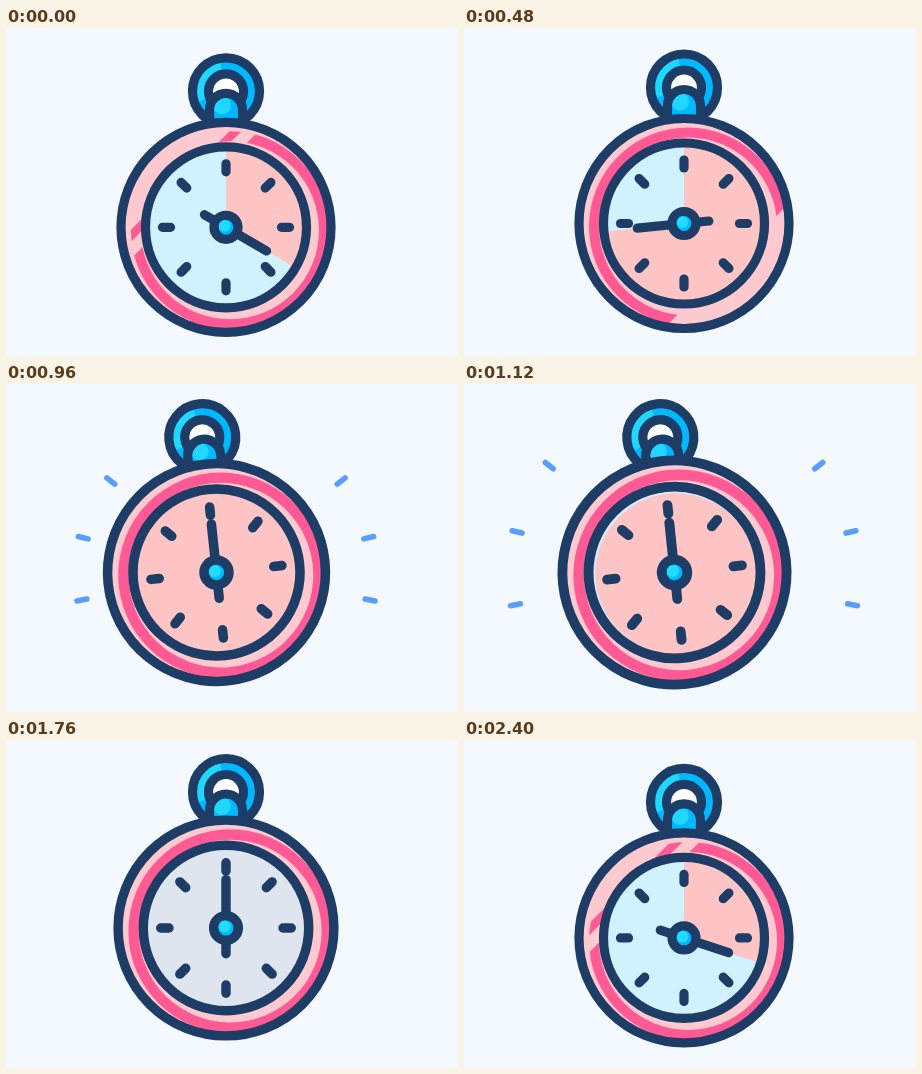
These frames come from a looping animation (452x328 px, 2.44 s). An HTML page:

```html
<!DOCTYPE html>
<html lang="en">
<head>
<meta charset="utf-8">
<title>Stopwatch</title>
<style>
  html, body { margin: 0; width: 100%; height: 100%; overflow: hidden; background: #f4f9ff; }
  svg { display: block; width: 100vw; height: 100vh; }
  .ink { stroke: #1d3c66; stroke-width: 9.2; stroke-linecap: round; stroke-linejoin: round; }
</style>
</head>
<body>
<svg viewBox="0 0 452 328">
  <defs>
    <clipPath id="rim"><circle r="105"/></clipPath>
    <clipPath id="dial"><circle r="80.5"/></clipPath>
    <clipPath id="dome"><path d="M-16.5 -98V-117.5a16.5 16.5 0 0 1 33 0V-98z"/></clipPath>
  </defs>
  <g id="rays" stroke="#5a9dff" stroke-linecap="round"></g>
  <g id="watch">
    <g transform="translate(0 -136)">
      <circle r="33.5" fill="#00b8ff"/>
      <path d="M-24 9A25.6 25.6 0 0 1 -5 -25.1" fill="none" stroke="#20d8ff" stroke-width="8"/>
      <circle class="ink" r="33.5" fill="none"/>
      <circle class="ink" r="17.5" fill="#fff"/>
    </g>
    <g clip-path="url(#dome)">
      <rect x="-17" y="-135" width="34" height="40" fill="#00b8ff"/>
      <circle cx="-4" cy="-122" r="9" fill="#20d8ff"/>
    </g>
    <path class="ink" d="M-16.5 -99V-117.5a16.5 16.5 0 0 1 33 0V-99" fill="none"/>
    <g id="face">
      <g clip-path="url(#rim)">
        <circle r="105" fill="#ffc9d0"/>
        <circle cx="4" cy="3" r="99" fill="#ff5a94"/>
        <circle cx="4" cy="3" r="89" fill="#ffc9d0"/>
        <g transform="rotate(45)" fill="#ffc9d0">
          <g id="shine">
            <rect x="-56.6" y="-120" width="56.6" height="240"/>
            <rect x="8.5" y="-120" width="12" height="240"/>
          </g>
        </g>
      </g>
      <circle class="ink" r="105" fill="none"/>
      <circle r="80.5" fill="#d0f2ff"/>
      <g clip-path="url(#dial)"><path id="sector" fill="#ffc4c4"/></g>
      <circle class="ink" r="80.5" fill="none"/>
      <g id="ticks"></g>
      <path id="hand" class="ink" d="M0 25V-47"/>
      <circle class="ink" r="12" fill="#00b8ff"/>
      <circle cx="-1.4" cy="-1.4" r="5.8" fill="#20dcff"/>
    </g>
  </g>
</svg>
<script>
const LOOP = 2440, RESTART = 2040, RUN = 1200;
const $ = id => document.getElementById(id);
const clamp = x => Math.max(0, Math.min(1, x));
const part = (t, a, b) => clamp((t - a) / (b - a));
const ease = x => (1 - Math.cos(Math.PI * x)) / 2;
const rad = d => d * Math.PI / 180;
const set = (el, attrs) => { for (const k in attrs) el.setAttribute(k, attrs[k]); };

function add(parent, tag, attrs) {
  const el = document.createElementNS('http://www.w3.org/2000/svg', tag);
  set(el, attrs);
  parent.appendChild(el);
  return el;
}

for (let a = 0; a < 360; a += 45)
  add($('ticks'), 'path', { class: 'ink', d: 'M0 -55.5V-63.5', transform: `rotate(${a})` });

const rays = [-38.3, -13.5, 11, 169, 193.5, 218.3].map(a =>
  ({ dx: Math.cos(rad(a)), dy: Math.sin(rad(a)), el: add($('rays'), 'line', {}) }));

function sectorPath(deg, r, off) {
  if (deg <= 0) return '';
  if (deg >= 360) return `M${off - r} ${off}a${r} ${r} 0 1 1 ${2 * r} 0a${r} ${r} 0 1 1 ${-2 * r} 0z`;
  const x = r * Math.sin(rad(deg)), y = -r * Math.cos(rad(deg));
  return `M0 0V${-r}A${r} ${r} 0 ${deg > 180 ? 1 : 0} 1 ${x} ${y}z`;
}

function drawRays(t) {
  const r = 196 - 83 * (1 - part(t, 800, 1500)) ** 2;
  const size = part(t, 800, 900) * (1 - part(t, 1400, 1560));
  for (const { dx, dy, el } of rays)
    set(el, {
      x1: 220 + dx * (r - 5 * size), y1: 188 + dy * (r - 5 * size),
      x2: 220 + dx * (r + 5 * size), y2: 188 + dy * (r + 5 * size),
      'stroke-width': size > 0 ? 5.6 * Math.min(1, size * 2) : 0
    });
}

function draw(t) {
  // time since the hand last left twelve
  const run = t >= RESTART ? t - RESTART : t + LOOP - RESTART;
  const y = 188 + 14.5 * Math.sin(Math.PI * clamp((run + 12) / RUN)) ** 2;

  const grow = ease(part(t, 640, 1360)) * (1 - ease(part(t, 1360, 2000)));
  const scale = 1 + 0.09 * grow;
  const ring = t > 800 && t < 1720;
  const swing = 6 * (1 - part(t, 1120, 1760));
  const tilt = ring ? -swing * Math.cos(Math.PI * (t - 1120) / 80) * part(t, 800, 880) : 0;

  set($('watch'), { transform: `translate(220 ${y}) rotate(${tilt} 0 91)` });
  set($('face'), { transform: `scale(${scale})` });

  const deg = Math.min(360, run * 0.3);
  set($('hand'), { transform: `rotate(${deg})` });
  set($('sector'), {
    d: sectorPath(deg, 80.5 / scale, 1.5 * grow),
    opacity: t < RESTART ? 1 - part(t, 1360, 1920) : 1
  });

  const s = run - 400;
  const sweep = -93 + 0.43 * s + 0.00022 * s * s;
  set($('shine'), { transform: `translate(${sweep / Math.SQRT2} 0)` });

  drawRays(t);
}

const start = performance.now();
function tick() {
  draw((performance.now() - start) % LOOP);
  requestAnimationFrame(tick);
}
draw(0);
requestAnimationFrame(tick);
</script>
</body>
</html>
```
